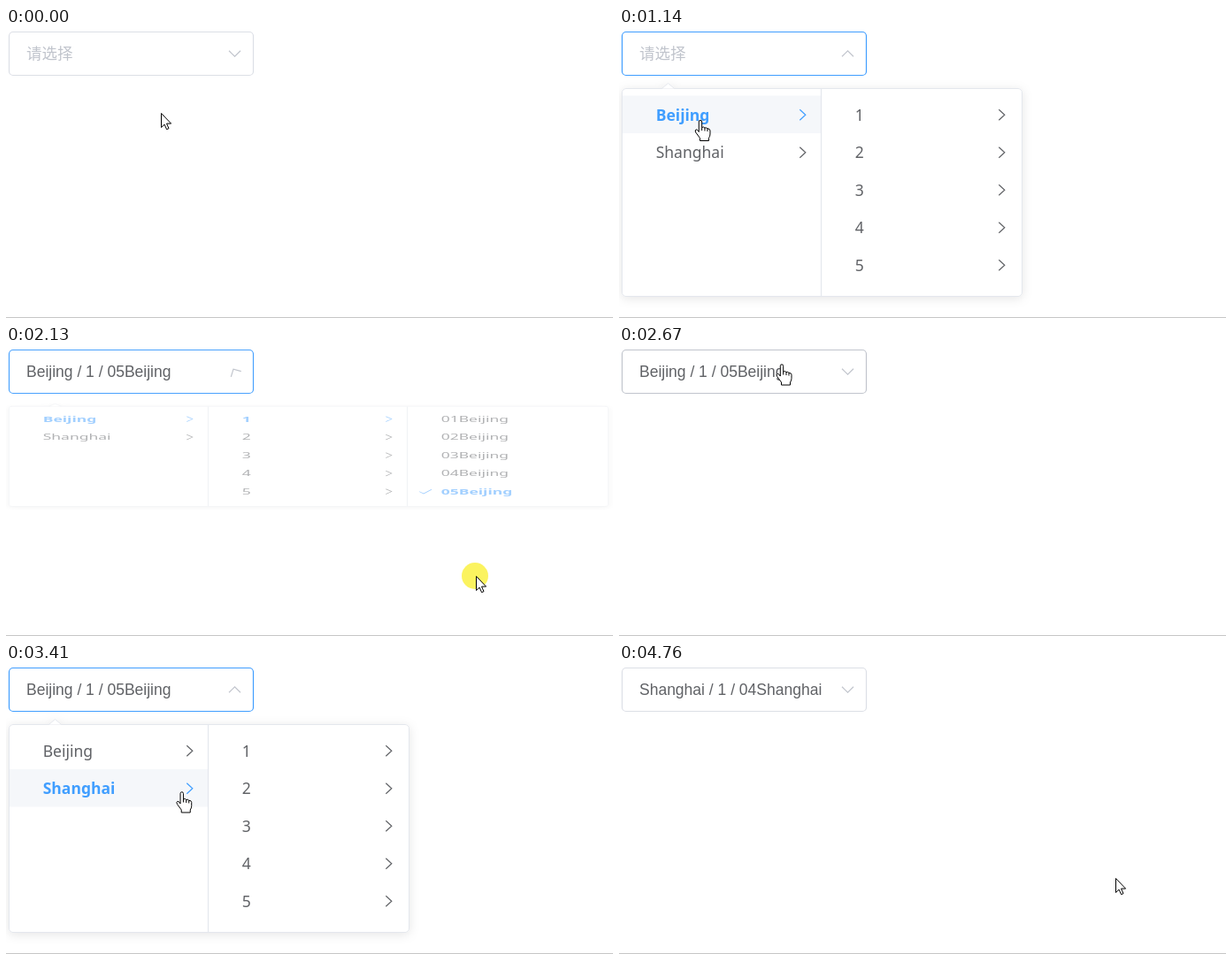
Animation of 686x328 px, one loop 5.09 s. Source, as an HTML page:

```html
<!DOCTYPE html>
<html lang="zh">
<head>
<meta charset="utf-8">
<title>Cascader</title>
<style>
  html, body { margin: 0; width: 100%; height: 100%; overflow: hidden; background: #fff; }
  svg { display: block; width: 686px; height: 328px; }
  text { font: 17.5px "Noto Sans", sans-serif; fill: #606266; }
  path { fill: none; stroke: #606266; stroke-width: 1.2; }
  #value { font-family: "Liberation Sans", Arial, sans-serif; }
  #value.empty { font-family: "Noto Sans CJK SC", "Noto Sans CJK", sans-serif; fill: #c0c4cc; }
  #field { fill: #fff; stroke-width: 1.2; }
  #caret { stroke: #c0c4cc; }
  #panel { filter: drop-shadow(0 2px 6px rgba(0, 0, 0, .1)); }
  .box, .tip { fill: #fff; stroke: #e4e7ed; stroke-width: 1; }
  .divider { stroke: #e4e7ed; }
  .row { fill: #f5f7fa; }
  .on text { font-weight: 700; fill: #409eff; }
  .on path { stroke: #409eff; }
  #click { fill: #fbf35f; mix-blend-mode: multiply; }
  #cursor path { fill: #fff; stroke: #000; stroke-width: 1; stroke-linejoin: round; }
  #cursor path.crease { fill: none; }
</style>
</head>
<body>
<svg viewBox="0 0 686 328">
  <path d="M0 327.5H686" style="stroke:#c6c6c6;stroke-width:1"/>
  <rect id="field" x="3.5" y="4.5" width="276" height="49" rx="4.5"/>
  <text id="value" x="23" y="35.2"></text>
  <path id="caret" d="M-6.5 -3.2L0 3.2L6.5 -3.2"/>
  <g id="panel"></g>
  <circle id="click" r="15"/>
  <g id="cursor">
    <path id="arrow" d="M.5 .5V16.5L4.1 13.1L6.6 18.7L9 17.6L6.5 12.1H11.6Z"/>
    <g id="hand">
      <path d="M-1.7 13.5V2A1.7 1.7 0 0 1 1.7 2V8.5Q3.6 7.2 5 9Q6.8 8.2 8 9.8Q10.7 9.6 11 12V16Q11 18.500 9.500 20.500V23.500H-.5V20.500L-5.300 14Q-6.600 11.600 -4.800 10.800Q-3.300 10.600 -1.700 13.500Z"/>
      <path class="crease" d="M1.700 8.500V12M5 9V12.500M8 9.800V13"/>
    </g>
  </g>
</svg>
<script>
const LOOP = 5090, COL = 225, ROW = 42.5, TOP = 76.5;
const LIGHT = '#dcdfe6', HOVER = '#c0c4cc', FOCUS = '#409eff';
const cities = ['Beijing', 'Shanghai'];
const $ = id => document.getElementById(id);

const route = [ // time, x, y of the pointer
  [0, 175, 96], [120, 175, 96], [320, 166, 54], [470, 158, 36], [600, 156, 38],
  [730, 154, 54], [900, 54, 104], [1110, 54, 104], [1270, 250, 104], [1520, 461, 243],
  [1610, 477, 249], [1650, 477, 249], [1880, 531, 260], [2140, 531, 260], [2330, 390, 150],
  [2540, 190, 26], [2640, 184, 20], [2860, 184, 24], [3130, 190, 72], [3300, 196, 122],
  [3410, 198, 144], [3600, 337, 235], [3660, 337, 235], [3970, 542, 213], [4400, 542, 213],
  [4740, 561, 242], [LOOP, 561, 242]
];
const paths = [
  [0, []], [860, [0]], [1260, [0, 0]], [2080, [0, 0, 4]], [3200, [0]],
  [3300, [1]], [3480, [1, 2]], [3550, [1, 3]], [4380, [1, 3, 3]]
];
const values = [[0, '请选择'], [2080, 'Beijing / 1 / 05Beijing'], [4380, 'Shanghai / 1 / 04Shanghai']];
const borders = [
  [-999, LIGHT], [320, HOVER], [556, FOCUS], [2090, LIGHT],
  [2500, HOVER], [2850, FOCUS], [4390, LIGHT]
];
const openings = [[556, 2090], [2850, 4390]];
const clicks = [500, 2030, 2760, 4250];

function bezier(x1, y1, x2, y2) {
  const at = (a, b, s) => 3 * (1 - s) ** 2 * s * a + 3 * (1 - s) * s * s * b + s ** 3;
  return x => {
    if (x <= 0) return 0;
    if (x >= 1) return 1;
    let lo = 0, hi = 1;
    for (let i = 0; i < 24; i++) {
      const mid = (lo + hi) / 2;
      if (at(x1, x2, mid) < x) lo = mid; else hi = mid;
    }
    return at(y1, y2, lo);
  };
}
const zoom = bezier(.23, 1, .32, 1);
const ease = bezier(.25, .1, .25, 1);
const tint = bezier(.645, .045, .355, 1);

const lastIndex = (list, t) => list.findLastIndex(item => item[0] <= t);
const current = (list, t) => list[lastIndex(list, t)][1];

function pointer(t) {
  const i = Math.min(lastIndex(route, t), route.length - 2);
  const [t0, x0, y0] = route[i], [t1, x1, y1] = route[i + 1];
  const k = (t - t0) / (t1 - t0);
  return [x0 + (x1 - x0) * k, y0 + (y1 - y0) * k];
}

function openness(t, curve) {
  const span = openings.findLast(([from]) => from <= t);
  if (!span) return 0;
  const [from, to] = span;
  return t < to ? curve((t - from) / 300) : 1 - curve((t - to) / 300);
}

function borderColor(t) {
  const i = lastIndex(borders, t);
  if (!i) return LIGHT;
  const mix = tint((t - borders[i][0]) / 200) * 100;
  return `color-mix(in srgb, ${borders[i][1]} ${mix}%, ${borders[i - 1][1]})`;
}

function item(col, row, label, active, hovered) {
  const x = 4 + col * COL, y = TOP + row * ROW, mid = y + 21.8;
  const bg = hovered ? `<rect class="row" x="${x}" y="${y}" width="${COL - .5}" height="${ROW}"/>` : '';
  const icon = col < 2 ? `<path d="M${x + 200.3} ${mid - 6}l6.5 6l-6.5 6"/>`
    : active ? `<path d="M${x + 13} ${mid}l5 5l9 -10"/>` : '';
  return `<g class="${active ? 'on' : ''}">${bg}<text x="${x + 37.7}" y="${y + 28.2}">${label}</text>${icon}</g>`;
}

function panelMarkup(path, hover) {
  const count = Math.min(3, path.length + 1);
  const numbers = [1, 2, 3, 4, 5];
  const columns = [cities, numbers, numbers.map(n => `0${n}${cities[path[0]]}`)].slice(0, count);
  let out = `<rect class="box" x="3.5" y="68.500" width="${COL * count + 2}" height="235" rx="4.5"/>
    <path class="tip" d="M48.500 68.500L55.500 62.500L62.500 68.500"/>`;
  columns.forEach((labels, col) => {
    labels.forEach((label, row) => {
      out += item(col, row, label, path[col] === row, hover === `${col},${row}`);
    });
    if (col) out += `<path class="divider" d="M${3.5 + col * COL} 69V303"/>`;
  });
  return out;
}

let shown = '';
function render(t) {
  const [x, y] = pointer(t), path = current(paths, t);
  const open = openness(t, zoom), value = current(values, t);

  const col = Math.floor((x - 4) / COL), row = Math.floor((y - TOP) / ROW);
  const onItem = open > .5 && row >= 0 && row < (col ? 5 : 2) && col <= path.length;
  const onField = x < 280 && y > 4 && y < 53.5;
  const hover = onItem ? `${col},${row}` : '';

  const key = path + '|' + hover;
  if (key !== shown) $('panel').innerHTML = panelMarkup(path, hover);
  shown = key;

  $('panel').setAttribute('transform', `translate(0 68) scale(1 ${Math.max(open, .001)}) translate(0 -68)`);
  $('panel').style.opacity = open;
  $('panel').style.display = open > .002 ? '' : 'none';

  $('value').textContent = value;
  $('value').setAttribute('class', t < values[1][0] ? 'empty' : '');
  $('field').style.stroke = borderColor(t);
  $('caret').setAttribute('transform', `translate(258.500 29) rotate(${180 * openness(t, ease)})`);

  const hand = onItem || onField;
  $('hand').style.display = hand ? '' : 'none';
  $('arrow').style.display = hand ? 'none' : '';
  $('cursor').setAttribute('transform', `translate(${x} ${y})`);
  $('click').setAttribute('transform', `translate(${x - 1} ${y})`);
  $('click').style.display = clicks.some(c => t >= c && t < c + 130) ? '' : 'none';
}

const start = performance.now();
function tick() {
  render((performance.now() - start) % LOOP);
  requestAnimationFrame(tick);
}
tick();
</script>
</body>
</html>
```
